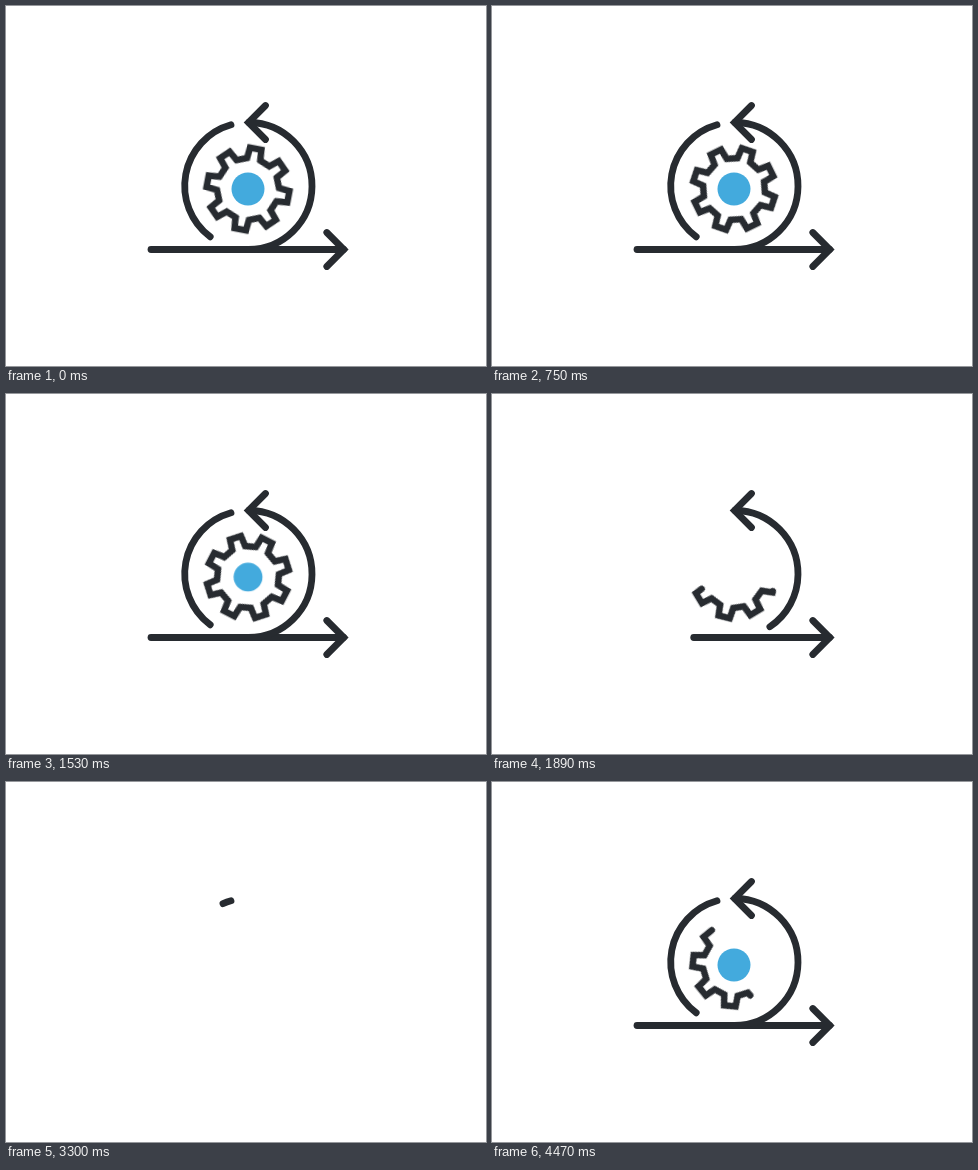
Recreate the animation shown at these times as an HTML page. Size 480 by 360 pixels, loop 4.5 s.

```html
<!DOCTYPE html>
<html lang="en">
<head>
<meta charset="utf-8">
<title>Iteration loop</title>
<style>
  html, body { margin: 0; width: 100%; height: 100%; overflow: hidden; background: #fff; }
  svg { display: block; width: 100vw; height: 100vh; }

  .ink {
    fill: none;
    stroke: #272b30;
    stroke-width: 6.8;
    stroke-linecap: round;
    stroke-dasharray: 1 2;
  }
  .ink, .dot, .spin {
    animation: 4.5s infinite cubic-bezier(.333, 0, .667, 1);
  }
  .dot { fill: #43aadd; transform-origin: 242px 183px; animation-name: dot; }
  .spin { animation-name: spin; animation-timing-function: linear; }
  .gear { stroke-width: 6.5; animation-name: gear; }
  .left { animation-name: left; }
  .line { animation-name: line; }
  .right { animation-name: right; }
  .front { animation-name: front; }
  .back { animation-name: back; }

  /* Strokes leave from their start, then draw in again */
  @keyframes left {
    0%, 36.67% { stroke-dashoffset: 0; visibility: visible; }
    41.89%, 60% { stroke-dashoffset: -1; visibility: hidden; }
    60.01%, 72.56% { stroke-dashoffset: 1; visibility: hidden; }
    77.89%, 100% { stroke-dashoffset: 0; visibility: visible; }
  }
  @keyframes line {
    0%, 37.67% { stroke-dashoffset: 0; visibility: visible; }
    49.78%, 60% { stroke-dashoffset: -1; visibility: hidden; }
    60.01%, 73.6% { stroke-dashoffset: 1; visibility: hidden; }
    83.67%, 100% { stroke-dashoffset: 0; visibility: visible; }
  }
  @keyframes right {
    0%, 38.67% { stroke-dashoffset: 0; visibility: visible; }
    50.67%, 60% { stroke-dashoffset: -1; visibility: hidden; }
    60.01%, 74.3% { stroke-dashoffset: 1; visibility: hidden; }
    86.3%, 100% { stroke-dashoffset: 0; visibility: visible; }
  }
  /* The loop restarts while the gear is still drawing */
  @keyframes gear {
    0%, 36.67% { stroke-dashoffset: 0; visibility: visible; }
    46.1%, 60% { stroke-dashoffset: -1; visibility: hidden; }
    60.01% { stroke-dashoffset: 1; visibility: hidden; }
    93.11% {
      stroke-dashoffset: 1;
      visibility: hidden;
      animation-timing-function: cubic-bezier(.333, 0, .667, .333);
    }
    100% { stroke-dashoffset: .42; visibility: visible; }
  }
  @keyframes spin {
    0% { transform: rotate(11deg); }
    16.67% { transform: rotate(-116deg); }
    26.67% { transform: rotate(-189deg); }
    42% { transform: rotate(-301deg); }
    50% { transform: rotate(-360deg); }
    50.01%, 93.11% { transform: rotate(6.4deg); }
    100% { transform: rotate(-43.9deg); }
  }
  /* Arrowheads open and close around the tip */
  @keyframes front {
    0%, 48.67% { stroke-dasharray: 1 2; stroke-dashoffset: 0; visibility: visible; }
    52.67%, 81.11% { stroke-dasharray: 0 2; stroke-dashoffset: -.5; visibility: hidden; }
    85.56%, 100% { stroke-dasharray: 1 2; stroke-dashoffset: 0; visibility: visible; }
  }
  @keyframes back {
    0%, 48.67% { stroke-dasharray: 1 2; stroke-dashoffset: 0; visibility: visible; }
    52.67%, 85.11% { stroke-dasharray: 0 2; stroke-dashoffset: -.5; visibility: hidden; }
    89.56%, 100% { stroke-dasharray: 1 2; stroke-dashoffset: 0; visibility: visible; }
  }
  @keyframes dot {
    0%, 23.33% { transform: scale(1); }
    26.67% { transform: scale(.93); }
    35.56% { transform: scale(.87); }
    41.33%, 81.11% { transform: scale(0); }
    86.44%, 100% { transform: scale(1); }
  }
</style>
</head>
<body>
<svg viewBox="0 0 480 360">
  <path class="ink left" pathLength="1" d="M225 118.8A63.5 63.5 0 0 0 204.2 230.8"/>
  <path class="ink line" pathLength="1" d="M145 243.5H337.5"/>
  <path class="ink right" pathLength="1" d="M242 243.5A63.5 63.5 0 0 0 243 116.5"/>
  <path class="ink front" pathLength="1" d="M320.8 226.5L337.8 243.5L320.8 260.5"/>
  <path class="ink back" pathLength="1" d="M259.5 99.5L242.5 116.5L259.5 133.5"/>
  <circle class="dot" cx="242" cy="183" r="16.5"/>
  <g transform="translate(242 183)">
    <g class="spin"><path id="gear" class="ink gear" pathLength="1"/></g>
  </g>
</svg>
<script>
  // Angles run clockwise from the top
  const polar = (deg, r) => {
    const a = deg * Math.PI / 180;
    return `${(r * Math.sin(a)).toFixed(2)} ${(-r * Math.cos(a)).toFixed(2)}`;
  };
  const root = 31, tip = 41.5;
  const points = [polar(191, 34.5), polar(192.5, root)];
  for (let k = 1; k <= 8; k++) {
    const c = 180 + 45 * k;
    points.push(polar(c - 12.5, root), polar(c - 8, tip), polar(c + 8, tip));
    if (k < 8) points.push(polar(c + 12.5, root));
  }
  document.getElementById('gear').setAttribute('d', `M${points.join('L')}Z`);
</script>
</body>
</html>
```
